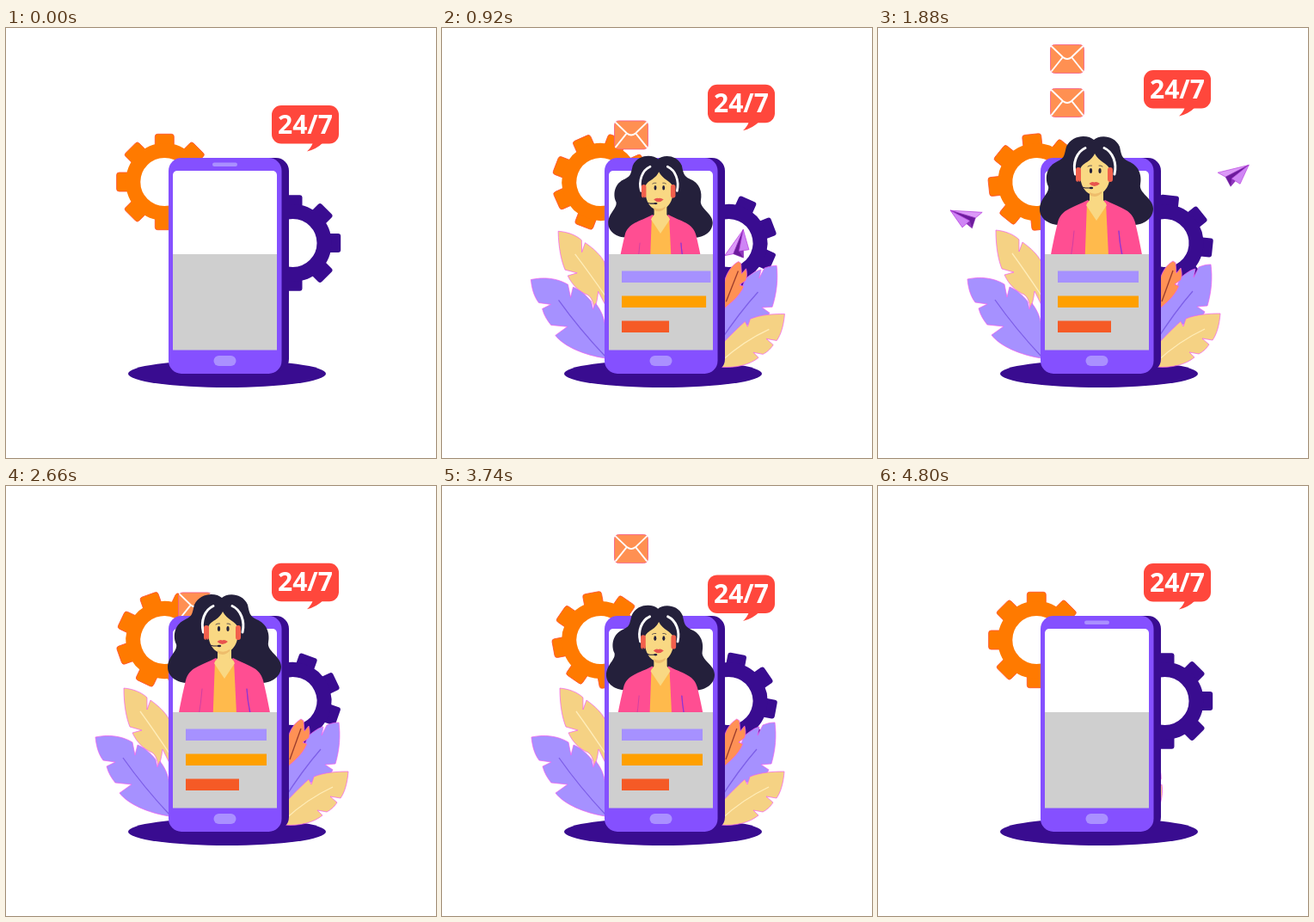
Recreate the animation shown at these times as an HTML page with a canvas. Size 500 by 500 pixels, loop 4820 ms.

```html
<!DOCTYPE html>
<html lang="en">
<head>
<meta charset="utf-8">
<title>24/7 support</title>
<style>
html, body { margin: 0; width: 100%; height: 100%; overflow: hidden; background: #fff; }
canvas { display: block; width: 500px; height: 500px; }
</style>
</head>
<body>
<canvas id="stage" width="500" height="500"></canvas>
<script>
const ctx = document.getElementById('stage').getContext('2d');
const LOOP = 4820;
const VIOLET = '#8550ff', DARK = '#390c90', LILAC = '#a691ff', YELLOW = '#f5d284', FRINGE = '#f25cf0';
const SKIN = '#f9d883', HAIR = '#24203b', CORAL = '#f2604d';

const lerp = (a, b, p) => a + (b - a) * p;
const progress = (t, start, duration) => Math.min(1, Math.max(0, (t - start) / duration));
const ease = (t, start, duration) => (1 - Math.cos(Math.PI * progress(t, start, duration))) / 2;

function paint(color, edge, width = 0.8) {
  ctx.fillStyle = color;
  ctx.fill();
  if (edge) line(edge, width);
}

function line(color, width) {
  ctx.strokeStyle = color;
  ctx.lineWidth = width;
  ctx.stroke();
}

function shape(path, color, edge, width) {
  const p = new Path2D(path);
  if (color) { ctx.fillStyle = color; ctx.fill(p); }
  if (edge) { ctx.strokeStyle = edge; ctx.lineWidth = width; ctx.stroke(p); }
}

function box(x, y, w, h, r, color, edge) {
  ctx.beginPath();
  ctx.roundRect(x, y, w, h, r);
  paint(color, edge);
}

function oval(x, y, rx, ry, color) {
  ctx.beginPath();
  ctx.ellipse(x, y, rx, ry, 0, 0, 7);
  paint(color);
}

function placed(x, y, degrees, draw) {
  ctx.save();
  ctx.translate(x, y);
  ctx.rotate(degrees * Math.PI / 180);
  draw();
  ctx.restore();
}

function mirrored(axis, draw) {
  draw();
  ctx.save();
  ctx.translate(2 * axis, 0);
  ctx.scale(-1, 1);
  draw();
  ctx.restore();
}

function gear(x, y, degrees, color, edge) {
  placed(x, y, degrees, () => {
    for (let i = 0; i < 8; i++) {
      ctx.rotate(Math.PI / 4);
      box(-11, -55.7, 22, 18, 3, color, edge);
    }
    ctx.beginPath();
    ctx.arc(0, 0, 36.5, 0, 7);
    line(color, 17);
  });
}

// Outlines show the open pose; each leaf swings about (x, y) to hide behind the phone.
const leaves = [
  {
    x: 197, y: 325, swing: 80, enter: 100, exit: 3830, fall: 700, color: YELLOW, veinColor: '#ffedb8',
    outline: 'M137 235 C148 236 158 240 164 246 L164 260 L168 249 C178 256 186 264 190 272 L194 330 L182 306 C181 314 180 320 177 326 C176 318 174 313 170 310 C160 306 152 298 147 287 L158 284 L144 280 C140 270 137 255 137 235 Z',
    vein: 'M156 262 Q172 284 192 314'
  },
  {
    x: 190, y: 384, swing: 76, enter: 40, exit: 3962, fall: 800, color: LILAC, veinColor: '#7d5fe8',
    outline: 'M104 292 C118 289 134 290 147 298 L150 313 L153 301 C160 304 168 310 174 318 L176 327 L179 320 C185 328 189 336 190 348 L190 384 C165 380 142 370 132 357 L146 347 L127 345 C123 340 119 334 117 326 L127 321 L113 319 C107 311 105 302 104 292 Z',
    vein: 'M136 316 Q160 350 190 382'
  },
  {
    x: 322, y: 375, swing: -55, enter: 100, exit: 3890, fall: 800, color: LILAC, veinColor: '#7d5fe8',
    outline: 'M387 275 C389 290 388 306 383 323 L371 324 L380 330 C376 338 370 344 364 346 L352 344 L357 351 C348 357 338 364 326 374 L318 372 L322 330 C328 316 336 304 346 295 L346 305 L351 291 C358 285 364 281 369 280 L367 290 L373 278 C378 276 382 275 387 275 Z',
    vein: 'M366 306 Q345 330 322 366'
  },
  {
    x: 325, y: 330, swing: -37, enter: 130, exit: 3720, fall: 450, color: '#ff9155', veinColor: '#9a3b2c',
    outline: 'M343 271 C336 275 331 282 328 292 L324 330 C334 320 344 314 350 300 L345 298 L352 293 C354 288 353 282 352 279 L347 285 L346 273 Z',
    vein: 'M343 282 Q338 296 330 318'
  },
  {
    x: 318, y: 398, swing: -60, enter: 40, exit: 4020, fall: 800, color: YELLOW, veinColor: '#ffedb8',
    outline: 'M398 332 C397 345 394 356 389 363 L377 361 L385 368 C381 374 377 377 373 379 L362 377 L368 383 C358 391 342 396 322 394 L318 398 L318 376 C330 362 340 352 352 341 L355 347 L358 338 C370 333 384 332 398 332 Z',
    vein: 'M380 350 Q350 364 324 388'
  }
];

function drawLeaf(leaf, t) {
  if (t < leaf.enter) return;
  const over = -4 * Math.sign(leaf.swing);
  const turn = lerp(leaf.swing, over, ease(t, leaf.enter, 600))
    - over * ease(t, leaf.enter + 600, 350)
    + leaf.swing * ease(t, leaf.exit, leaf.fall);
  placed(leaf.x, leaf.y, turn, () => {
    ctx.translate(-leaf.x, -leaf.y);
    ctx.lineJoin = 'round';
    shape(leaf.outline, leaf.color, FRINGE, 0.7);
    shape(leaf.vein, null, leaf.veinColor, 1.3);
  });
}

function envelope(t, start) {
  const age = t - start;
  if (age < 50 || age > 1375) return;
  const y = lerp(13, 152, ease(t, start, 1375));
  ctx.save();
  ctx.translate(200, y);
  box(0.5, 0.5, 39, 33, 5, '#ff9052', '#f5588c');
  ctx.lineCap = 'round';
  shape('M2 2.5 L15 15 Q20 19 25 15 L38 2.5 M2 31 L14 16 M38 31 L26 16', null, '#fff', 1.9);
  ctx.restore();
}

function plane(x, y, degrees, flip) {
  placed(x, y, degrees, () => {
    ctx.scale(flip, 1);
    ctx.lineJoin = 'round';
    shape('M19 -13 L-17 -4 L-8 1 Z', '#dc9af8', '#b944df', 0.7);
    shape('M19 -13 L-8 1 L-2 12 Z', '#6c1b9c', '#8b2fb8', 0.5);
    shape('M19 -13 L-1 3 L9 9 Z', '#cf85f5', '#b944df', 0.7);
    shape('M-2 12 L-1 3 L3 6 Z', '#8f35bd');
  });
}

function drawPlanes(t) {
  if (t > 433 && t < 2530) {
    const p = ease(t, 433, 2100), u = progress(t, 433, 2100);
    plane(331 + 104 * p, 283 - 220 * p + 100 * p * p, lerp(-61, 28, u), 1);
  }
  if (t > 830 && t < 2500) {
    const p = ease(t, 830, 1650), u = progress(t, 830, 1650);
    plane(222 - 165 * p, 290 - 150 * p + 75 * p * p, lerp(18, -27, u), -1);
  }
}

function phone() {
  box(196, 151, 133, 249, 15, DARK);
  box(189, 151, 131.5, 251, 15, VIOLET);
  box(194, 166, 121, 208, 5, '#fff');
  ctx.fillStyle = '#cfcfcf';
  ctx.fillRect(194, 263, 121, 111.5);
  box(240, 156.5, 29, 4.5, 2.2, '#aa90ff');
  box(241.5, 381, 26, 12, 6, '#aa90ff');
}

const bars = [
  { y: 282.5, width: 94, color: LILAC, enter: 260, exit: 4092 },
  { y: 311.5, width: 94, color: '#ffa000', enter: 356, exit: 3881 },
  { y: 340.5, width: 62, color: '#f55a26', enter: 451, exit: 3596 }
];

function drawBar(bar, t) {
  const grow = 1.1 * ease(t, bar.enter, 660) - 0.1 * ease(t, bar.enter + 660, 300);
  ctx.fillStyle = bar.color;
  ctx.fillRect(209, bar.y, bar.width * grow * (1 - ease(t, bar.exit, 660)), 13.5);
}

function woman(t) {
  const grow = 1.05 * ease(t, 380, 700) - 0.05 * ease(t, 1080, 320);
  const scale = grow * (1 - ease(t, 3531, 1533));
  if (scale < 0.4) return;
  ctx.save();
  ctx.beginPath();
  ctx.rect(0, 0, 500, 263);
  ctx.clip();
  ctx.translate(254, 413);
  ctx.scale(scale, scale);
  ctx.translate(-254, -413);
  ctx.lineCap = 'round';

  shape('M251 130 C245 124 226 123 219 138 C216 150 217 151 207 156 C195 162 194 176 198 184 C200 192 188 198 188 211 C188 222 200 230 214 229 C224 228 232 220 240 214 L268 214 C276 220 284 228 294 229 C308 230 320 222 320 210 C320 198 303 192 305 182 C307 172 304 160 291 155 C283 151 283 147 281 138 C275 124 257 124 251 130 Z', HAIR);
  mirrored(254, () => {
    shape('M244 200 C228 209 213 210 209 226 C205 242 202 258 197 285 L254.5 285 L254.5 210 Z', '#ff4e92');
    shape('M228 236 Q227 250 224 268', null, '#cf3fa2', 1);
  });
  shape('M280 236 Q281 252 285 268', null, '#8a35d8', 1.2);
  shape('M243 203 L240 285 L269 285 L265 203 Z', '#ffba4c');
  shape('M246 186 L246 200 L242 206 L254 224 L266 206 L262 200 L262 186 Z', SKIN);

  ctx.translate(-1, 0);
  shape('M253 146 C248 157 238 156 236 165 C235 181 241 194 253 194 C266 194 272 181 271 165 C268 157 258 156 253 146 Z', SKIN);
  shape('M247 191 Q254 195 261 190 L261 192 Q254 199 247 194 Z', '#eebd6c');

  shape('M230.5 170 C227 157 232 144 242 139.5', null, '#fff', 3);
  shape('M276 170 C279 157 274 144 264 139.5', null, '#fff', 3);
  box(231, 162, 6, 17, 3, CORAL);
  box(268, 162, 6, 17, 3, CORAL);
  shape('M234 178 Q235 185 242 186 L249 186', null, HAIR, 1.2);
  oval(249, 186, 2.2, 1.2, HAIR);

  oval(248.5, 166, 1.6, 3, HAIR);
  oval(259, 166, 1.6, 3, HAIR);
  shape('M245 161 Q247 159.5 249.5 160 M258 160 Q260 159.5 262 161', null, HAIR, 0.7);
  shape('M246.5 181 Q250 178 252.5 179.5 Q255 178 259 181 Q252.5 187 246.5 181 Z', '#e8544e');
  ctx.restore();
}

function bubble(t) {
  const y = t < 1700 ? lerp(90, 47, ease(t, 0, 1700))
    : t < 3220 ? lerp(47, 108, ease(t, 1700, 1520))
    : lerp(108, 90, ease(t, 3220, 1540));
  ctx.save();
  ctx.translate(0, y);
  box(309, 0, 78, 44.5, 11, '#ff473c');
  shape('M357 43 Q355 49 350 53.5 Q361 51 369 43 Z', '#ff473c');
  ctx.fillStyle = '#fff';
  ctx.font = 'bold 30px "Open Sans", "Noto Sans", sans-serif';
  ctx.textAlign = 'center';
  ctx.fillText('24/7', 348, 32.7);
  ctx.restore();
}

function render(t) {
  ctx.fillStyle = '#fff';
  ctx.fillRect(0, 0, 500, 500);
  const spin = t / 4800 * 360;
  gear(184.3, 179, -spin, '#ff7a00', '#ff5030');
  gear(333.5, 250, spin, DARK);
  [72, 1272, 1697, 3223].forEach(start => envelope(t, start));
  drawPlanes(t);
  oval(257, 402, 115, 16, DARK);
  leaves.forEach(leaf => drawLeaf(leaf, t));
  phone();
  bars.forEach(bar => drawBar(bar, t));
  woman(t);
  bubble(t);
}

const begin = performance.now();
function tick() {
  const t = (performance.now() - begin) % LOOP;
  render(Math.floor(t / 20) * 20);
  requestAnimationFrame(tick);
}
tick();
</script>
</body>
</html>
```
